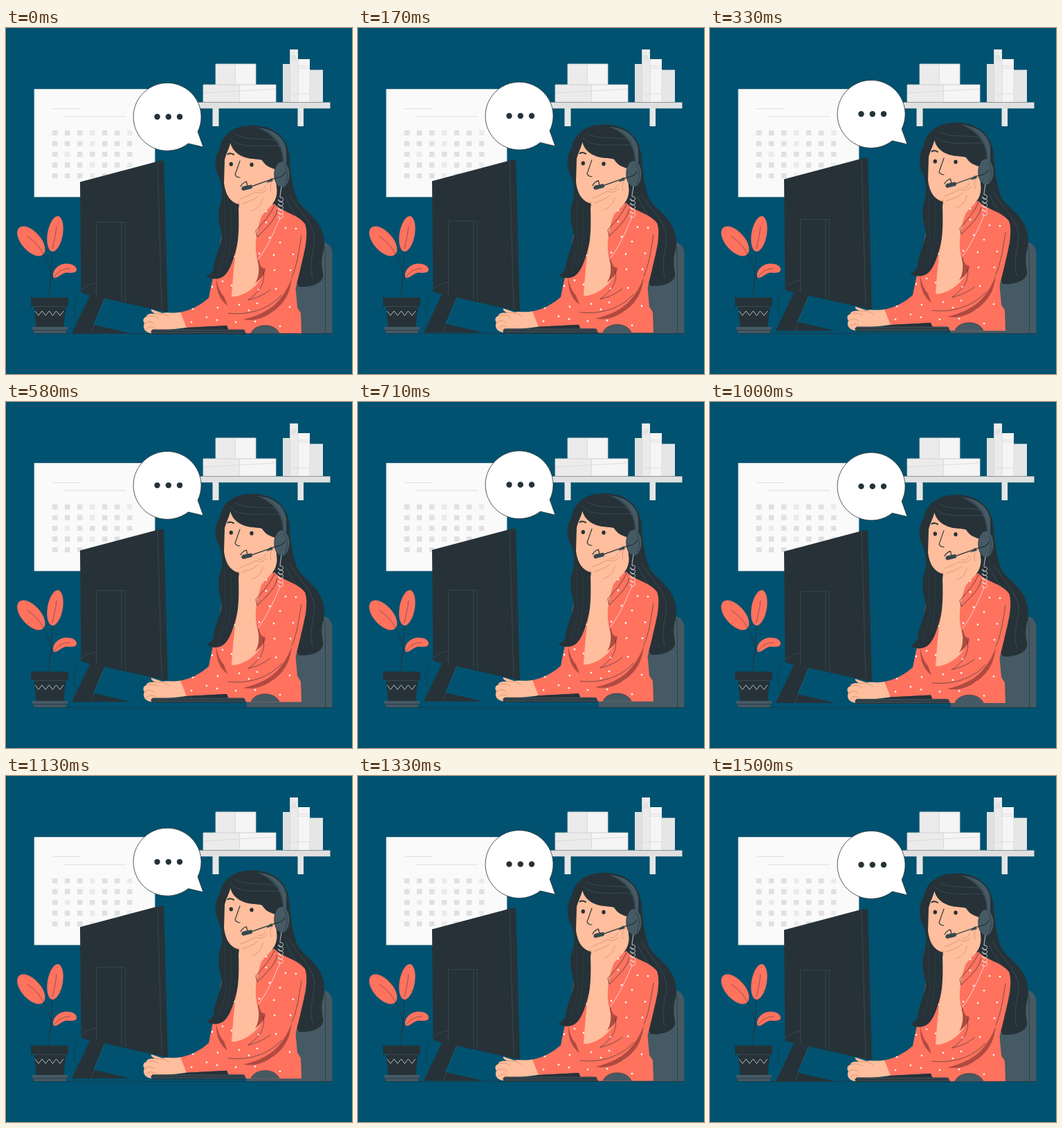
Write an HTML page that moves like this. It is 500 px wide and 500 px high and loops after 1.54 s.

```html
<!DOCTYPE html>
<html lang="en">
<head>
<meta charset="utf-8">
<title>Support agent</title>
<style>
  html, body { margin: 0; width: 100%; height: 100%; overflow: hidden; background: #005270; }
  svg { display: block; width: 100%; height: 100%; stroke-width: .8; }
  .ink { fill: #263238; }
  .grey { fill: #455a64; }
  .coral { fill: #ff725e; }
  .skin { fill: #ffbe9d; }
  .shade { fill: #b04a40; }
  .line { fill: none; stroke: #263238; stroke-linecap: round; stroke-linejoin: round; }
  .soft { fill: none; stroke: #455a64; }
  .fold { fill: none; stroke: #d98d69; stroke-linecap: round; }
  .pale { fill: none; stroke: #d6d6d6; }
</style>
</head>
<body>
<svg viewBox="0 0 500 500">
  <defs>
    <clipPath id="shirtClip"><use href="#shirt"/></clipPath>
  </defs>

  <g id="calendar">
    <path d="M41 88.500H215V244H41Z" fill="#fafafa" stroke="#e0e0e0"/>
    <path class="pale" d="M68 116.500H108M83 128H173"/>
  </g>

  <g id="shelf">
    <path d="M298.500 115H307.500V142H298.500ZM421.500 115H430V142H421.500Z" fill="#e6e6e6"/>
    <path d="M276 107.500H468.500V116.300H276Z" fill="#e0e0e0"/>
    <path d="M303 52H361V82H303Z" fill="#f5f5f5"/>
    <path d="M303 52H331.500V82H303Z" fill="#ebebeb"/>
    <path d="M285 82H390V107H285Z" fill="#f5f5f5"/>
    <path d="M285 82H337.500V107H285Z" fill="#ebebeb"/>
    <path class="pale" d="M303 52H361V82H303ZM285 82H390V107H285ZM285 94L337 91L390 88M331.500 52V82M337.500 82V107"/>
    <path d="M400 52H411V107H400Z" fill="#e0e0e0"/>
    <path d="M410.500 31H422V107H410.500Z" fill="#ebebeb"/>
    <path d="M422 45H439V107H422Z" fill="#f5f5f5"/>
    <path d="M439 60.500H458V107H439Z" fill="#e6e6e6"/>
    <path class="pale" d="M410.500 31V107M422 45V107M439 60V107M422 55H439M422 58H439M422 95H439M411 46H422M411 96H422"/>
    <circle cx="416" cy="42" r="3" fill="#e0e0e0"/>
    <path d="M276 107.500H468.500" stroke="#8a9399" stroke-width=".7"/>
  </g>

  <g id="plant">
    <path class="line" d="M62 388C62 368 68 345 67 319M64 352C63 343 60 335 54 327M63 372C64 366 66 362 70 359"/>
    <ellipse class="coral" rx="26" ry="13.800" transform="translate(36.300 308) rotate(48)"/>
    <ellipse class="coral" rx="25.800" ry="11" transform="translate(71 297.500) rotate(-80)"/>
    <path class="coral" d="M69 361C65 352 75 341 86 340.500C96 340 103 345 102 350C101 354 95 354 89 353.500C80 353 76 362 69 361Z"/>
    <path class="line" d="M31 301C40 307 49 316 54 327M73 287C72 299 69 310 67 319M70 359C76 351 84 347 92 348" stroke-width=".5"/>
    <path class="ink" d="M40 400H87L83 433H44Z"/>
    <path class="ink" d="M36 389.500H90V402H36Z"/>
    <path class="soft" d="M40 402.500H86" stroke-width=".6"/>
    <path d="M42 409l5 6.500l5 -6.500l5 6.500l5.500 -6.500l5 6.500l5 -6.500l5.500 6.500l5 -6.500" fill="none" stroke="#e0e0e0"/>
    <path class="grey" d="M36.500 432H90L88 437H39Z"/>
    <path class="grey" d="M40 437H87V441H40Z"/>
    <path class="line" d="M39 437H88"/>
  </g>

  <g id="chair">
    <path class="grey" d="M347.500 441.500V433L410 420V370L425 335Q425 309 443 309H456Q471 311 471.500 326V441.500Z"/>
    <path class="line" d="M456 309Q461 313 461.500 326V441" stroke-width=".6"/>
  </g>

  <g id="float">
    <g id="bubble">
      <path d="M277.100 149.900L285 172L263.400 166.900A49 49 0 1 1 277.100 149.900Z" fill="#fff" stroke="#263238"/>
      <g class="ink">
        <circle cx="218.500" cy="128.300" r="4.200"/><circle cx="234.800" cy="128.300" r="4.200"/><circle cx="251" cy="128.300" r="4.200"/>
      </g>
    </g>

    <g id="monitor">
      <path class="line" d="M131 369C112 371 98 386 98 405C98 413 100 418 104 422" stroke-width=".6"/>
      <path class="ink" d="M95 441.500L128 372L143 389L126 428.500L181.500 441.500Z"/>
      <path class="ink" d="M107 222.500L222 192Q228 190.500 228.200 194L234 411L112 384Q108.500 383 108.500 379Z"/>
      <path class="soft" d="M219 194L225 407M130.500 386V280.500H172.500V395M167 281V393M131 369C121 370 113 374 109 379M143 390L123 441" stroke-width=".7" opacity=".75"/>
    </g>

    <g id="woman">
      <path class="ink" d="M350 141C388 138 409 160 410 190C411 207 414 226 418 240C422 257 437 264 447 277C458 290 462 306 459 322C455 333 456 345 458 355C460 367 445 375 423 374L385 300L335 225Z"/>
      <path class="soft" d="M409 240C422 264 446 282 446 307C444 326 438 340 443 362M404 245C417 275 436 285 433 318" stroke-width=".6"/>

      <path id="shirt" class="coral" d="M388 254C398 266 422 269 432 283C438 298 431 325 425 350L418.500 376L421 404L426 412L427 441.500H345V436H321L319 430L261 433L251 411C268 408 283 399 293 390C297 368 303 345 307 325L314 289L336 270Z"/>
      <g id="dots" clip-path="url(#shirtClip)"></g>

      <path class="skin" d="M252 410.500C243 413 233 410 226 412L210 406.500C209 409 212 411 216 413C207 412 203 414 203 417C197 419 198 424 200 427C197 432 200 440 209 441L226 437L261 433Z"/>
      <path class="fold" d="M216 413C225 412 232 414 236 418M203 417C209 415 216 416 220 419M200 427C205 423 212 424 215 428M203 435C207 431 212 431 215 434"/>
      <path class="ink" d="M250 435L261 433L319 430L322 437H248Z"/>
      <path class="shade" d="M304 362C303 379 309 393 320 401L315 388Q306 378 304 362Z"/>

      <path class="ink" d="M352 141C330 141 312 154 309 174C301 186 301 202 307 214C313 226 314 243 309 256C304 275 310 288 312 301C309 320 300 335 300 349C296 356 292 358 289 358C295 364 307 364 314 359C327 349 333 320 340 285L362 235L392 215L400 185C400 160 383 141 352 141Z"/>
      <path class="soft" d="M315 242C319 265 314 290 318 313C315 328 311 340 308 350M325 255C326 280 326 310 317 345" stroke-width=".5" opacity=".5"/>

      <path class="skin" d="M316 190C318 182 322 175 324.500 166C330 182 346 188 366 190L390 196L391 240L366 253L337 255C324 252 317 241 315 224Z"/>
      <path d="M334 252C343 254 352 250 359 244L361 254L340 259Z" fill="#eb996e"/>
      <path class="ink" d="M324.500 167C327 155 338 148 352 147C376 149 393 165 398 185V200L389 204C381 202 373 198 369 189C352 191 330 186 324.500 167Z"/>
      <path class="soft" d="M325 160C338 176 370 168 399 171M331 154C350 164 377 157 397 164" stroke-width=".6"/>

      <path class="line" d="M338 192L331 212Q333 216 338 216" stroke-width="1.100"/>
      <path class="line" d="M320.500 182.500Q324 180 329 183M350 187Q358 184.500 366 189" stroke-width="2"/>
      <g class="ink">
        <ellipse cx="325.300" cy="196.800" rx="2.700" ry="3"/><ellipse cx="355" cy="197.600" rx="2.700" ry="3"/>
      </g>
      <path class="line" d="M339 229C341 225 344 223 347.500 222L349 229" stroke-width="1.200"/>

      <path class="skin" d="M338 247C346 238 355 235 364 234C369 225 378 218 386 219C393 227 393 241 388 250C383 259 373 266 369 273C364 287 360 305 361 322C362 338 367 349 371 357C361 380 346 391 326 388C327 370 329 350 331 330C336 310 337 290 336 262Z"/>
      <path class="fold" d="M339 247C346 244 354 241 361 237C367 240 372 239 377 233M341 254C350 251 358 249 364 243M364 234C369 237 372 234 375 228M356 264C365 260 370 254 371 246M386 219C382 224 381 230 383 236"/>

      <path class="coral" d="M425 300C409 324 390 337 374 349C368 369 350 387 325 389L321 413C345 418 385 408 402 388L418.500 376Z"/>
      <g id="armDots"></g>
      <path class="shade" d="M363 333C366 344 367 358 360 369C370 361 377 352 374 347Q368 349 365 334Z"/>
      <path class="shade" d="M343 421C365 416 383 407 394 394C404 382 409 372 413 361C411 380 405 392 395 402C380 417 360 425 343 421Z"/>
      <path class="line" d="M321 412C348 416 380 407 398 386M372 352C375 368 367 381 350 393M350 393C363 390 374 385 382 378M427 300C423 325 420 345 413 360" stroke-width=".6"/>
      <path class="line" d="M388 256C382 270 371 282 361 293L363 302C376 289 389 278 392 263" stroke-width=".7"/>

      <path d="M362 144C386 145 402 158 405 176V196H400C400 173 390 153 362 144Z" class="grey"/>
      <path class="line" d="M362 144C391 151 400 170 401 196" stroke-width=".6"/>
      <ellipse class="grey" cx="398.500" cy="212" rx="11" ry="18.500"/>
      <path class="line" d="M392 196C385 206 387 226 396 230M402 199C408 206 407 219 403 226" stroke-width=".7"/>
      <path class="line" d="M403 209C400 216 392 216 386 218L352 230" stroke-width="1.300"/>
      <path d="M383 217L376 224L386 221ZM342 229L354 226.500Q358 228 355 232L343 235Q338 233 342 229Z" fill="#37474f"/>
      <path id="cord" fill="none" stroke="#f0f0f0"/>

      <path class="grey" d="M354 441.500C359 427 388 425 395 441.500Z"/>
      <path class="line" d="M354 441C359 427 388 425 395 441" stroke-width=".6"/>
      <path d="M212 435.500H342Q346 437 347 442H212Q207 439 212 435.500Z" fill="#37474f"/>
      <path class="line" d="M210 438.500H344M211 442H346" stroke-width="1"/>
    </g>
  </g>
  <path class="line" d="M40 441.500H472" stroke-width=".7"/>
</svg>

<script>
  const NS = "http://www.w3.org/2000/svg";
  const $ = id => document.getElementById(id);

  function add(parent, tag, attrs) {
    const el = document.createElementNS(NS, tag);
    for (const key in attrs) el.setAttribute(key, attrs[key]);
    parent.appendChild(el);
  }

  // Calendar days, a few of them lighter
  const faint = new Set([3, 6, 10, 15, 24, 27, 31]);
  for (let i = 0; i < 35; i++) {
    add($("calendar"), "rect", {
      x: 67 + (i % 7) * 18, y: 148 + Math.floor(i / 7) * 15.5,
      width: 7.5, height: 7.2, fill: faint.has(i) ? "#ebebeb" : "#e0e0e0"
    });
  }

  // Polka dots on the shirt and the raised sleeve
  const dot = parent => ([cx, cy]) => add(parent, "circle", { cx, cy, r: 1.35, fill: "#fff" });
  [[376, 265], [376, 281], [404, 289], [419, 290], [396, 310], [387, 328], [381, 303],
   [366, 326], [298, 374], [313, 366], [318, 346], [330, 330], [312, 388], [270, 406],
   [268, 425], [290, 418], [306, 404], [305, 422], [332, 425], [360, 424], [396, 431],
   [410, 403], [326, 372]].forEach(dot($("dots")));
  [[415, 327], [388, 350], [411, 350], [390, 377], [369, 354], [365, 378], [337, 400],
   [351, 408], [363, 398], [384, 410]].forEach(dot($("armDots")));

  // Coiled headset cord
  let cord = "M398 230C397 237 396 241 396 245";
  for (let i = 0; i < 5; i++) cord += "c7 -1 5 7 0 6c-5 -1 -2 -6 0 0";
  $("cord").setAttribute("d", cord + "C391 285 380 315 363 336");

  const LOOP = 1540, FPS = 24, RISE = 8.8, SWING = 1520, LEAD = 25;

  function draw(now) {
    const step = Math.floor(((now % LOOP) + 5) * FPS / 1000);
    const phase = (step * 1000 / FPS + LEAD) / SWING;
    const y = -RISE * (1 - Math.cos(2 * Math.PI * phase)) / 2;
    $("float").setAttribute("transform", `translate(0 ${y.toFixed(2)})`);
  }

  const start = performance.now();
  function tick() {
    draw(performance.now() - start);
    requestAnimationFrame(tick);
  }
  tick();
</script>
</body>
</html>
```
